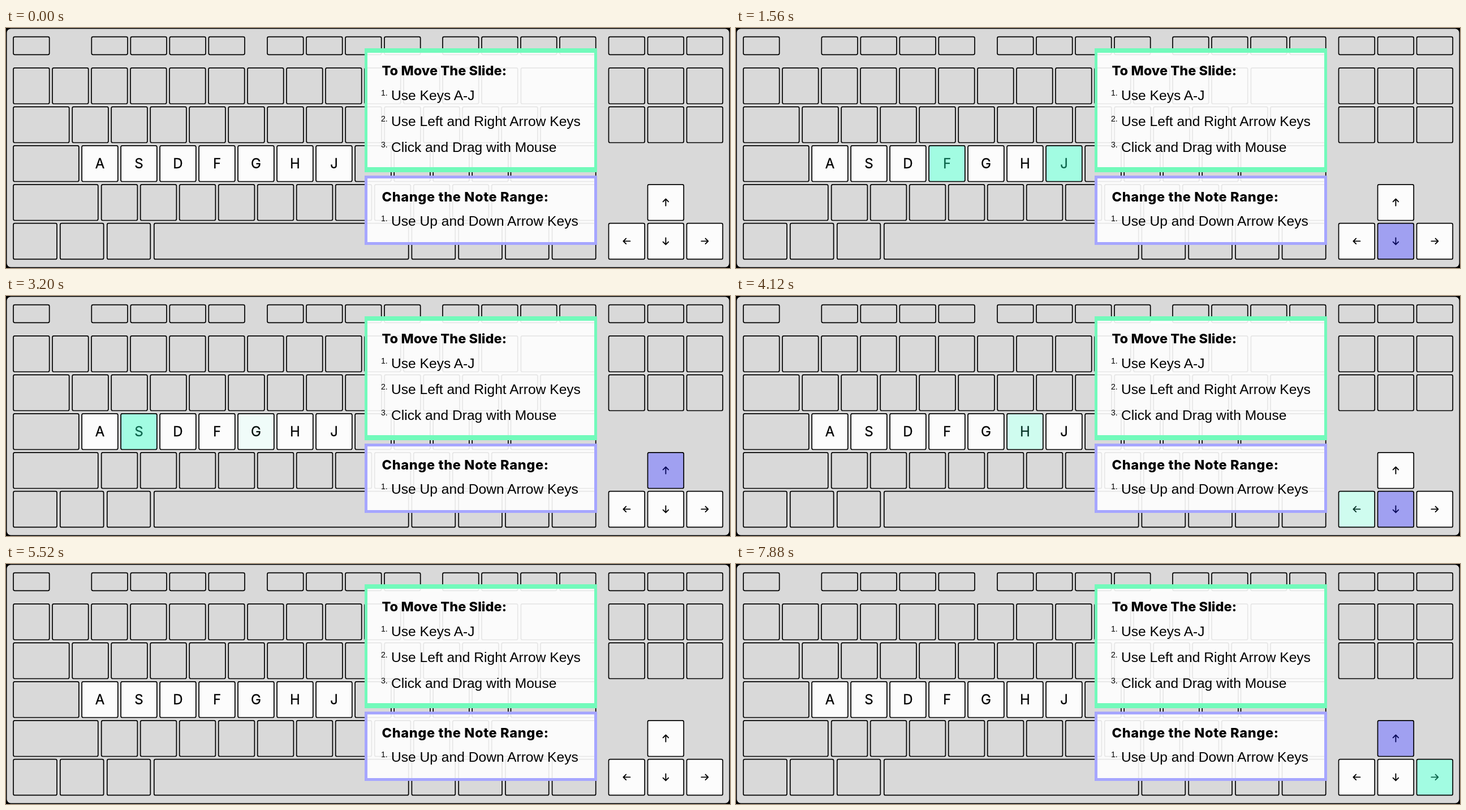
An HTML page that plays this animation: 1280 by 426 pixels, repeating every 8000 ms.

```html
<!DOCTYPE html>
<html lang="en">
<head>
<meta charset="utf-8">
<title>Keyboard controls</title>
<style>
html, body { margin: 0; width: 100%; height: 100%; overflow: hidden; background: #000; }
svg { display: block; width: 100vw; height: 100vh; }
.key { fill: none; stroke: #000; stroke-width: 1.7; }
.cap { fill: #fcfcfc; }
.letter { font: 400 24px Inter, sans-serif; text-anchor: middle; stroke: #000; stroke-width: .3; }
.arrow { fill: none; stroke: #000; stroke-width: 1.9; stroke-linecap: round; stroke-linejoin: round; }
.head { font: 800 23.6px Inter, sans-serif; }
.item { font: 24.6px "Liberation Sans", Arial, sans-serif; }
.num { font: 14px "Liberation Sans", Arial, sans-serif; }
</style>
</head>
<body>
<svg id="stage" viewBox="0 0 1280 426" xmlns="http://www.w3.org/2000/svg"></svg>
<script>
const LOOP = 8000, TICK = 40, FADE = 80;
const PITCH = 69, KEY = 63.7;
const MINT = '#1bfab9', VIOLET = '#1616de';

const box = (x, y, w, h, cls = 'key') =>
  `<rect class="${cls}" x="${x}" y="${y}" width="${w}" height="${h}" rx="2.5"/>`;
const run = (x, n, y, h = KEY) =>
  Array.from({ length: n }, (_, i) => box(x + i * PITCH, y, KEY, h)).join('');
const span = (x, end, y) => box(x, y, end - x, KEY);

// Rows of plain keys
function plainKeys() {
  const top = 15.6, rows = [70.8, 139.8, 208.8, 277.8, 346.7], [r1, r2, r3, r4, r5] = rows;
  return [
    run(13, 1, top, 31.7), run(151.3, 4, top, 31.7), run(462, 4, top, 31.7),
    run(772, 4, top, 31.7), run(1065.5, 3, top, 31.7),
    run(13, 13, r1), span(910.4, 1042.7, r1), run(1065.5, 3, r1),
    span(13, 111.7, r2), run(117.2, 12, r2), span(945, 1042.7, r2), run(1065.5, 3, r2),
    span(13, 128.8, r3), run(617.2, 4, r3), span(892.5, 1042.7, r3),
    span(13, 162.8, r4), run(168.7, 10, r4), span(858.7, 1042.7, r4),
    ...[[13, 90], [95.8, 172.6], [178.8, 255.3], [261.8, 711.7], [717.4, 794.3],
        [800.2, 877], [883, 959.7], [965.6, 1042.7]].map(([a, b]) => span(a, b, r5))
  ].join('');
}

// White keys carry a symbol and a colour overlay
function liveKey(id, x, y, symbol, layers) {
  const glow = layers.map(([name, color]) =>
    `<rect id="${name}" x="${x}" y="${y}" width="${KEY}" height="${KEY}" rx="2.5" fill="${color}" opacity="0"/>`);
  return box(x, y, KEY, KEY, 'cap') + symbol + glow.join('') + box(x, y, KEY, KEY);
}

const letterKey = (c, i) => {
  const x = 134.1 + i * PITCH;
  return liveKey(c, x, 208.8, `<text class="letter" x="${x + 31.9}" y="249">${c}</text>`, [[c, MINT]]);
};
const arrowKey = (id, x, y, turn, color) => liveKey(id, x, y,
  `<path class="arrow" d="M6 0H-6M-1.2 -4.8L-6 0L-1.2 4.8" transform="translate(${x + 31.9} ${y + 31.7}) rotate(${turn})"/>`,
  [[id, color]]);

function panel(y, h, top, bottom, color) {
  return `<rect x="634" y="${y}" width="411" height="${h}" fill="#fff" opacity=".9"/>
    <path fill="${color}" fill-rule="evenodd" d="M634 ${y}h411v${h}h-411zM639 ${y + top}v${h - top - bottom}h401v${bottom + top - h}z"/>`;
}
const head = (y, text, gap) => `<text class="head" x="664.5" y="${y}" letter-spacing="${gap}">${text}</text>`;
const item = (y, n, text) =>
  `<text class="num" x="663" y="${y - 8.5}">${n}.</text><text class="item" x="681" y="${y}">${text}</text>`;

document.getElementById('stage').innerHTML =
  '<rect width="1280" height="426"/><rect x="1.5" y="1.5" width="1277" height="423" rx="7" fill="#d9d9d9"/>' +
  plainKeys() + [...'ASDFGHJ'].map(letterKey).join('') +
  arrowKey('up', 1134.5, 277.8, 90, VIOLET) +
  arrowKey('left', 1065.5, 346.7, 0, MINT) +
  arrowKey('down', 1134.5, 346.7, -90, VIOLET) +
  arrowKey('right', 1203.5, 346.7, 180, MINT) +
  panel(36, 220, 8, 9, '#72fabb') +
  head(84, 'To Move The Slide:', 0) +
  item(128, 1, 'Use Keys A-J') +
  item(174, 2, 'Use Left and Right Arrow Keys') +
  item(220, 3, 'Click and Drag with Mouse') +
  panel(262, 123, 5, 5, '#a6a6ff') +
  head(307.5, 'Change the Note Range:', 0.6) +
  item(351, 1, 'Use Up and Down Arrow Keys');

// Key presses: [fade-in start, fade-out start]
const presses = {
  A: [[360, 800], [2920, 3040]],
  S: [[800, 1320], [3040, 3200]],
  D: [[3480, 3840]],
  F: [[1320, 2000]],
  G: [[2560, 2920], [3190, 3480]],
  H: [[3840, 4080]],
  J: [[1460, 2200]],
  left: [[4080, 4480], [4740, 5080], [7040, 7800]],
  right: [[4480, 4740], [6180, 7040], [7800, 9000]],
  down: [[1400, 2980], [3660, 5080]],
  up: [[2980, 3660], [5640, 9000]]
};

const ramp = (t, start) => Math.min(1, Math.max(0, (t - start) / FADE));
const level = (t, list) =>
  list.reduce((sum, [on, off]) => sum + ramp(t, on) - ramp(t, off), 0);
const lights = Object.entries(presses).map(([id, list]) => [document.getElementById(id), list]);

function draw(now) {
  const t = Math.floor((now % LOOP) / TICK) * TICK;
  for (const [el, list] of lights) el.setAttribute('opacity', (0.4 * level(t, list)).toFixed(3));
}

const begin = performance.now();
function frame() {
  draw(performance.now() - begin);
  requestAnimationFrame(frame);
}
frame();
</script>
</body>
</html>
```
